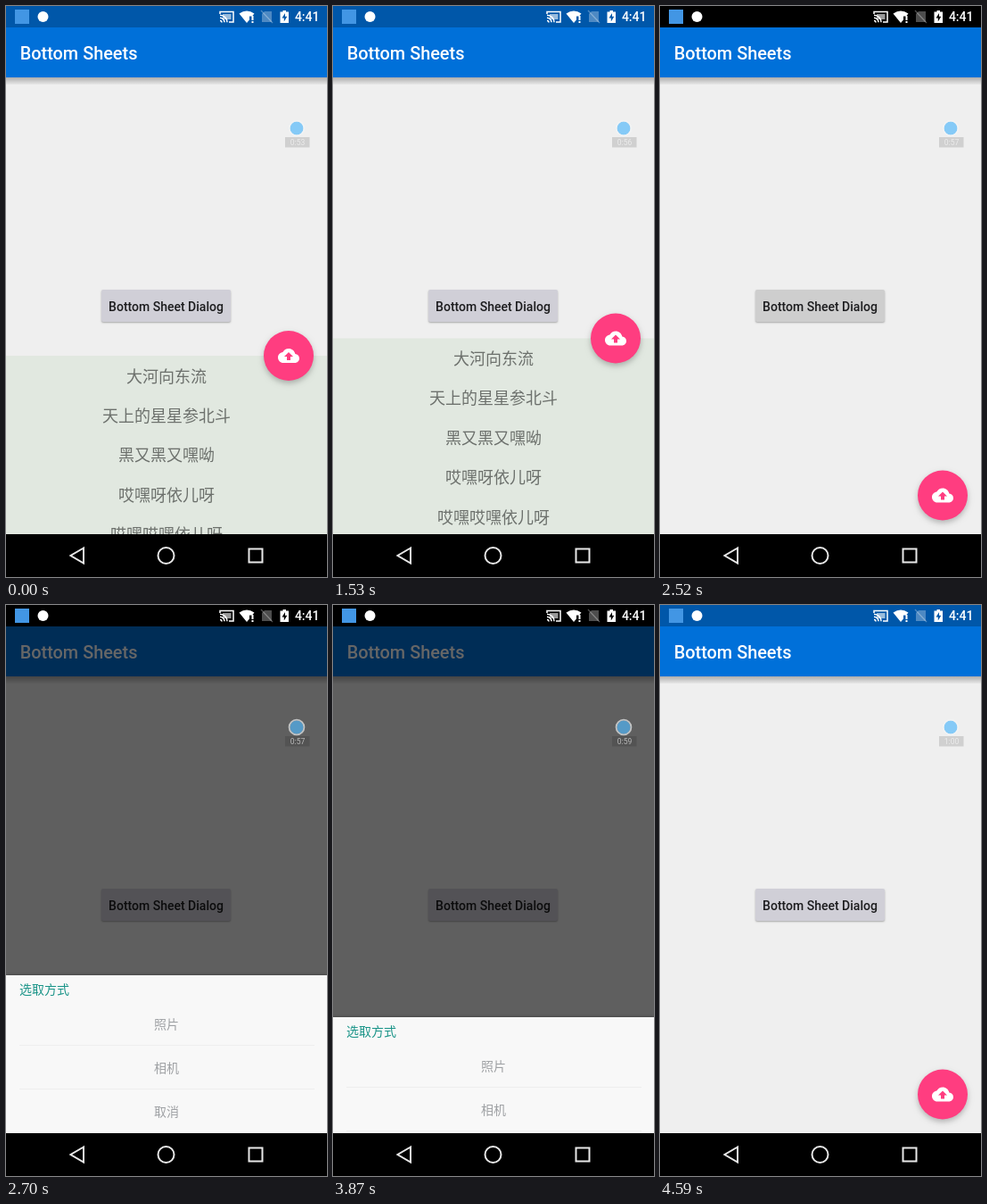
These frames come from a looping animation (360x640 px, 4.68 s). An HTML page with a canvas:

```html
<!DOCTYPE html>
<html lang="zh-CN">
<head>
<meta charset="utf-8">
<title>Bottom Sheets</title>
<style>
html, body { margin: 0; width: 100%; height: 100%; overflow: hidden; background: #000; }
canvas { display: block; }
</style>
</head>
<body>
<canvas id="stage" width="360" height="640"></canvas>
<script>
const c = document.getElementById('stage').getContext('2d');
const LOOP = 4680, STEP = 90, NAV = 592;
const LATIN = 'Roboto, sans-serif';
const CJK = '"Noto Sans CJK SC", "Noto Sans CJK", sans-serif';
const LYRICS = ['大河向东流', '天上的星星参北斗', '黑又黑又嘿呦', '哎嘿呀依儿呀',
  '哎嘿哎嘿依儿呀', '路见不平一声吼啊', '该出手时就出手啊', '风风火火闯九州啊'];
const CLOUD = new Path2D('M19.35 10.04C18.67 6.59 15.64 4 12 4 9.11 4 6.6 5.64 5.35 8.04 2.34 8.36 0 10.91 0 14c0 3.31 2.69 6 6 6h13c2.76 0 5-2.24 5-5 0-2.64-2.05-4.78-4.65-4.96zM14 13v4h-4v-4H7l5-5 5 5h-3z');
const CAST = new Path2D('M240 9V6.5H255V18H250M240 16.5a2 2 0 0 1 2 2M240 13.3a5 5 0 0 1 5 5M240 10.3a8 8 0 0 1 8 8');
const WIFI = new Path2D('M261.5 8.5Q270 2.5 278.5 8.5L276 11.5H273V15.5L270 19Z');
const SIM = new Path2D('M290 6H298V18H287V9Z');
const BATTERY = new Path2D('M310.5 5h3.5v1.5h3V19h-9.5V6.5h3Z');
const BOLT = new Path2D('M313 8l-3.5 5.5h2.3V17.5l3.5-5.8h-2.3Z');

// Keyframes: [time, value]
const sheetKeys = [[0, 392], [270, 392], [810, 237], [1170, 237], [1530, 372.5], [1620, 392],
  [1890, 392], [2250, 592], [LOOP, 592]];
const dialogKeys = [[2520, 527], [2610, 471], [2700, 415], [2880, 415], [3240, 509], [3690, 509],
  [4050, 415], [4140, 415], [4230, 471], [4320, 527]];
const fadeKeys = [[2520, 0], [2610, .6], [2700, 1], [4140, 1], [4230, .6], [4320, 0]];
const dimKeys = [[2520, 0], [2610, .43], [2700, .6], [4140, .6], [4230, .43], [4320, .15], [4410, 0]];

function track(keys, t) {
  if (t <= keys[0][0]) return keys[0][1];
  for (let i = 1; i < keys.length; i++) {
    const [t0, a] = keys[i - 1], [t1, b] = keys[i];
    if (t <= t1) return a + (b - a) * (t - t0) / (t1 - t0);
  }
  return keys[keys.length - 1][1];
}

function rect(x, y, w, h, color) {
  c.fillStyle = color;
  c.fillRect(x, y, w, h);
}

function disc(x, y, r, color) {
  c.fillStyle = color;
  c.beginPath();
  c.arc(x, y, r, 0, 2 * Math.PI);
  c.fill();
}

function text(s, x, y, font, color, align = 'left') {
  c.font = font;
  c.fillStyle = color;
  c.textAlign = align;
  c.fillText(s, x, y);
}

function shadowed(blur, dy, alpha, draw) {
  c.save();
  c.shadowColor = `rgba(0,0,0,${alpha})`;
  c.shadowBlur = blur;
  c.shadowOffsetY = dy;
  draw();
  c.restore();
}

function drawPage(top, pressed) {
  rect(0, 0, 360, 640, '#efefef');
  rect(0, 24, 360, 56, '#0070d9');
  const shade = c.createLinearGradient(0, 80, 0, 88);
  shade.addColorStop(0, 'rgba(0,0,0,.28)');
  shade.addColorStop(1, 'rgba(0,0,0,.03)');
  rect(0, 80, 360, 8, shade);
  text('Bottom Sheets', 15.7, 59.8, '500 19.9px ' + LATIN, '#fff');

  shadowed(2, 1, .3, () => {
    c.fillStyle = pressed ? '#cecece' : '#d0cfd7';
    c.beginPath();
    c.roundRect(107, 318, 145, 36, 2);
    c.fill();
  });
  text('Bottom Sheet Dialog', 179.5, 341.5, '500 14px ' + LATIN, '#1c1c1e', 'center');

  rect(0, top, 360, 355, '#e1e8e0');
  LYRICS.forEach((line, i) =>
    text(line, 180, top + 29.5 + i * 44.4, '18px ' + CJK, '#6c706c', 'center'));

  const y = Math.min(top, 548.5);
  shadowed(6, 3, .25, () => disc(317, y, 28, '#ff3d80'));
  c.save();
  c.translate(305, y - 12);
  c.fillStyle = '#fff';
  c.fill(CLOUD);
  c.restore();
}

function drawDialog(top, fade) {
  c.save();
  c.globalAlpha = fade;
  shadowed(3, -1, .25, () => rect(0, top, 360, 177, '#f8f8f8'));
  text('选取方式', 15, top + 21, '14px ' + CJK, '#1a9488', 'left');
  ['照片', '相机', '取消'].forEach((item, i) => {
    const y = top + 55 + i * 49;
    text(item, 180, y + 5, '14px ' + CJK, 'rgba(0,8,16,.36)', 'center');
    if (i < 2) rect(15, y + 23, 331, 1, 'rgba(0,0,0,.04)');
  });
  c.restore();
}

function drawStatus(shade) {
  rect(0, 0, 360, 24, '#0057a9');
  rect(0, 0, 360, 24, `rgba(0,0,0,${shade})`);
  rect(10, 4, 16, 16, '#4296e4');
  disc(41.5, 12, 6, '#fff');
  c.strokeStyle = '#fff';
  c.lineWidth = 1.5;
  c.stroke(CAST);
  rect(243, 9, 9.5, 6, 'rgba(255,255,255,.6)');
  c.fillStyle = '#fff';
  c.fill(WIFI);
  rect(275.5, 11, 2, 5, '#fff');
  rect(275.5, 17, 2, 2, '#fff');
  c.save();
  c.globalAlpha = .3;
  c.fill(SIM);
  c.lineWidth = 1.3;
  c.beginPath();
  c.moveTo(286, 5);
  c.lineTo(299, 19);
  c.stroke();
  c.restore();
  c.fillStyle = '#fff';
  c.fill(BATTERY);
  c.fillStyle = shade ? '#000' : '#0057a9';
  c.fill(BOLT);
  text('4:41', 351.5, 17, '500 14px ' + LATIN, '#fff', 'right');
}

function drawRecorder(t) {
  const s = Math.floor(53.95 + t * .00135);
  const label = Math.floor(s / 60) + ':' + String(s % 60).padStart(2, '0');
  c.save();
  c.globalAlpha = .67;
  disc(326, 137, 7.5, '#50b8fa');
  c.strokeStyle = '#f2f4f6';
  c.lineWidth = 1.8;
  c.beginPath();
  c.arc(326, 137, 8.4, 0, 2 * Math.PI);
  c.stroke();
  c.restore();
  rect(313, 147, 27.5, 11.5, 'rgba(0,0,0,.13)');
  text(label, 327, 156, '8.5px ' + LATIN, 'rgba(255,255,255,.6)', 'center');
}

function drawNav(alpha) {
  rect(0, NAV, 360, 640 - NAV, `rgba(0,0,0,${alpha})`);
  c.strokeStyle = '#e8e8e8';
  c.lineWidth = 2;
  c.beginPath();
  c.moveTo(87, 607.5);
  c.lineTo(72.5, 616);
  c.lineTo(87, 624.5);
  c.closePath();
  c.moveTo(188.5, 616);
  c.arc(179.5, 616, 9, 0, 2 * Math.PI);
  c.rect(272.5, 608.5, 15, 15);
  c.stroke();
}

function draw(t) {
  const fade = track(fadeKeys, t), dim = track(dimKeys, t);
  const dialogMode = t >= 2520 && t < 4410;
  const barAlpha = fade > 0 && fade < 1 ? .82 : 1;
  drawPage(track(sheetKeys, t), t >= 2430 && t < 2700);
  rect(0, 0, 360, NAV, `rgba(0,0,0,${dim})`);
  rect(0, NAV, 360, 640 - NAV, '#000');
  if (fade > 0) drawDialog(track(dialogKeys, t), fade);
  drawStatus(dialogMode ? barAlpha : 0);
  drawRecorder(t);
  drawNav(barAlpha);
}

function tick() {
  const t = performance.now() % LOOP;
  draw(Math.floor(t / STEP) * STEP);
  requestAnimationFrame(tick);
}
tick();
</script>
</body>
</html>
```
